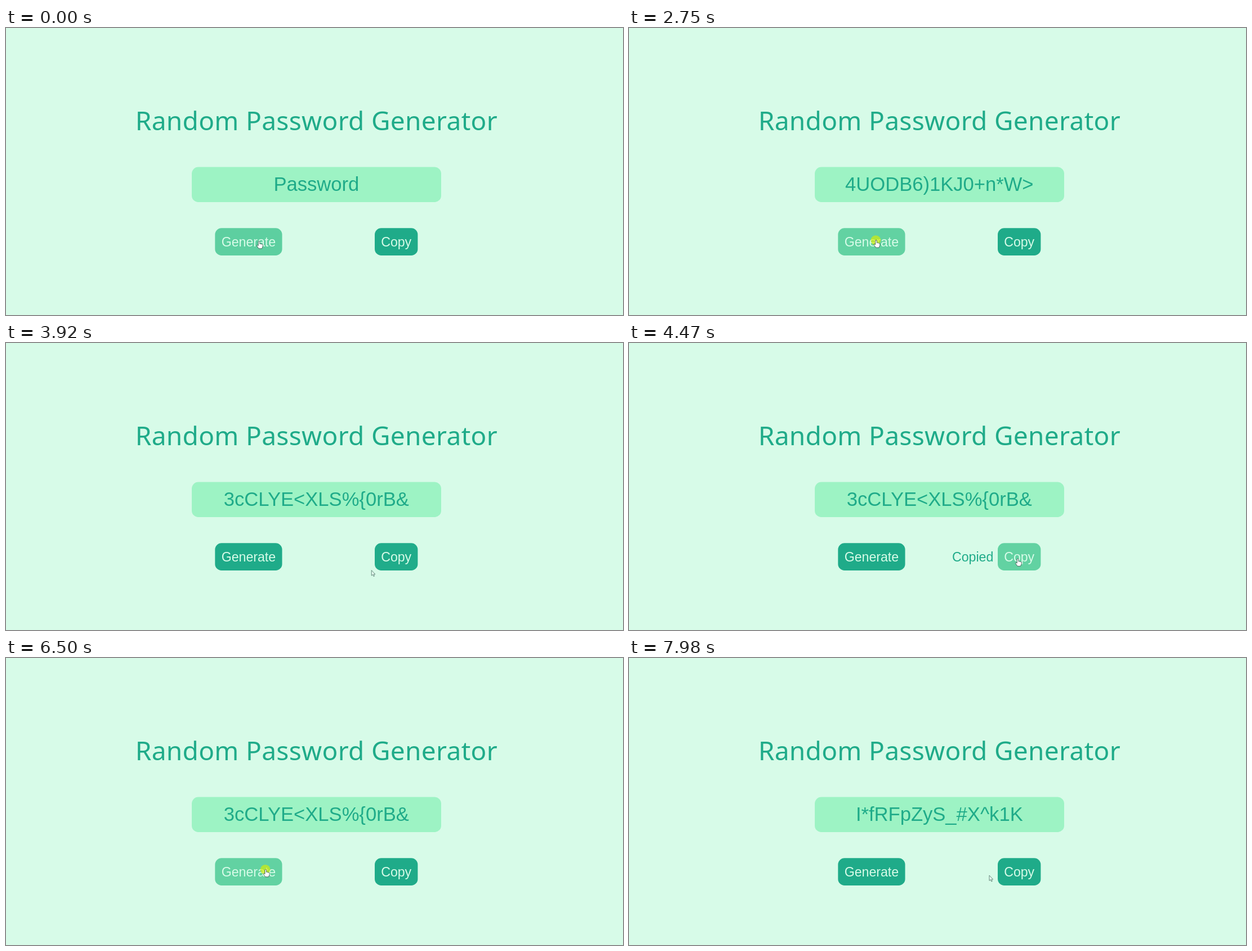
An HTML page for the animation above (8 s loop, 1096 by 511 pixels).

```html
<!DOCTYPE html>
<html lang="en">
<head>
<meta charset="utf-8">
<title>Random Password Generator</title>
<style>
  html, body { margin: 0; width: 100%; height: 100%; overflow: hidden; background: #d7fbe8; }
  svg { display: block; width: 100%; height: 100%; }
  text { text-anchor: middle; font: 23.15px "Liberation Sans", Arial, sans-serif; fill: #1fab89; }
  g text { fill: #d7fbe8; }
  .title { font: 46px "Noto Sans", "Open Sans", sans-serif; letter-spacing: .33px; }
  #password { font-size: 34.6px; }
</style>
</head>
<body>
<svg viewBox="0 0 1096 511">
  <rect width="1096" height="511" fill="#d7fbe8"/>
  <text class="title" x="551.4" y="182">Random Password Generator</text>
  <rect x="330" y="247.5" width="443" height="62.5" rx="11.6" fill="#9df3c4"/>
  <text id="password" x="551.3" y="290.4"></text>
  <g id="generate">
    <rect x="371.3" y="356.3" width="119.2" height="48.7" rx="11.6"/>
    <text x="430.9" y="388.5">Generate</text>
  </g>
  <text id="copied" x="610.7" y="388.5">Copied</text>
  <g id="copy">
    <rect x="655" y="356.3" width="76.4" height="48.7" rx="11.6"/>
    <text x="693.2" y="388.5">Copy</text>
  </g>
  <g id="cursor">
    <circle id="click" cx="-.7" cy=".3" r="8.8" fill="#dcee00" fill-opacity=".65"/>
    <path id="hand" fill="#fff" stroke="#2f4a42" stroke-width=".8" stroke-linejoin="round"
      d="M-1.3 8V1.2a1.3 1.2 0 0 1 2.6 0V4.8q1.3-.8 2 .3q1.4-.6 1.9.5q1.5-.2 1.5 1.3V9.5L5 13.3H-.5L-3.8 8.6q-.6-1.6.8-1.6z"/>
    <path id="arrow" fill="#e6fbf1" stroke="#4a6f63" stroke-width=".8" stroke-linejoin="round"
      d="M0 0V9.5L2.2 7.6L3.8 11L5.3 10.3L3.8 7.1H6.6z"/>
  </g>
</svg>
<script>
const LOOP = 8000, STEP = 68, PRESS = 130, FADE = 300;
const $ = id => document.getElementById(id);

// Each press of Generate shows a new password when released
const presses = [
  { at: 750, text: "buN2}p@ww?d&MW&+" },
  { at: 1870, text: "4UODB6)1KJ0+n*W>" },
  { at: 2750, text: "3cCLYE<XLS%{0rB&" },
  { at: 6500, text: "t7(Ufk2]xJ%q4rLz" },
  { at: 7370, text: "I*fRFpZyS_#X^k1K" }
];
const copyPress = { at: 4270 };
const copiedUntil = 5400;

const hovers = {
  generate: [{ enter: -200, leave: 3355 }, { enter: 6230, leave: 7632 }],
  copy: [{ enter: 3910, leave: 5855 }]
};

// Every move eases from the last resting place, bowing by dip and swinging by sway
const home = { x: 449.5, y: 379.5 };
const moves = [
  { from: 70, to: 750, x: 439, y: 377.7, dip: -16, sway: 27 },
  { from: 2954, to: 4235, x: 690.5, y: 384, dip: 44, sway: 0 },
  { from: 5662, to: 6406, x: 461.3, y: 376.5, dip: 6, sway: 0 },
  { from: 7500, to: 7974, x: 640, y: 387, dip: 2, sway: 0 }
];

const clamp = v => Math.max(0, Math.min(1, v));
const mix = (a, b, k) => a + (b - a) * k;
const smooth = k => k * k * (3 - 2 * k);
const blend = (a, b, k) => `rgb(${a.map((v, i) => Math.round(mix(v, b[i], k)))})`;

// CSS "ease": cubic-bezier(.25, .1, .25, 1)
function ease(x) {
  const curve = (u, p, q) => 3 * u * (1 - u) ** 2 * p + 3 * u * u * (1 - u) * q + u ** 3;
  let lo = 0, hi = 1;
  for (let i = 0; i < 20; i++) {
    const mid = (lo + hi) / 2;
    if (curve(mid, .25, .25) < x) lo = mid; else hi = mid;
  }
  return curve(lo, .1, 1);
}

function pointer(t) {
  let pos = home;
  for (const m of moves) {
    if (t < m.from) break;
    const held = Math.floor((t - m.from + 2) / STEP) * STEP;
    const k = smooth(clamp(held / (m.to - m.from)));
    pos = {
      x: mix(pos.x, m.x, k) + m.sway * Math.sin(2 * Math.PI * k),
      y: mix(pos.y, m.y, k) + m.dip * Math.sin(Math.PI * k)
    };
  }
  return pos;
}

function hoverLevel(spans, t) {
  return spans.reduce((sum, s) =>
    sum + ease(clamp((t - s.enter) / FADE)) - ease(clamp((t - s.leave) / FADE)), 0);
}

function inside(pos, id) {
  const b = $(id).firstElementChild.getBBox();
  return pos.x >= b.x && pos.x <= b.x + b.width && pos.y >= b.y && pos.y <= b.y + b.height;
}

function show(id, on) { $(id).setAttribute("visibility", on ? "visible" : "hidden"); }

function draw(t) {
  const released = presses.filter(p => t >= p.at + PRESS).pop();
  $("password").textContent = released ? released.text : "Password";

  const copied = Math.min((t - copyPress.at - 60) / 140, (copiedUntil - t) / 210);
  $("copied").setAttribute("opacity", clamp(copied));

  for (const id in hovers) {
    $(id).style.fill = blend([31, 171, 137], [98, 210, 162], hoverLevel(hovers[id], t));
  }

  const pos = pointer(t);
  const over = inside(pos, "generate") || inside(pos, "copy");
  $("cursor").setAttribute("transform", `translate(${pos.x} ${pos.y})`);
  show("hand", over);
  show("arrow", !over);
  show("click", [...presses, copyPress].some(p => t >= p.at && t < p.at + PRESS));
}

const begin = performance.now();
function tick() {
  draw((performance.now() - begin) % LOOP);
  requestAnimationFrame(tick);
}
tick();
</script>
</body>
</html>
```
